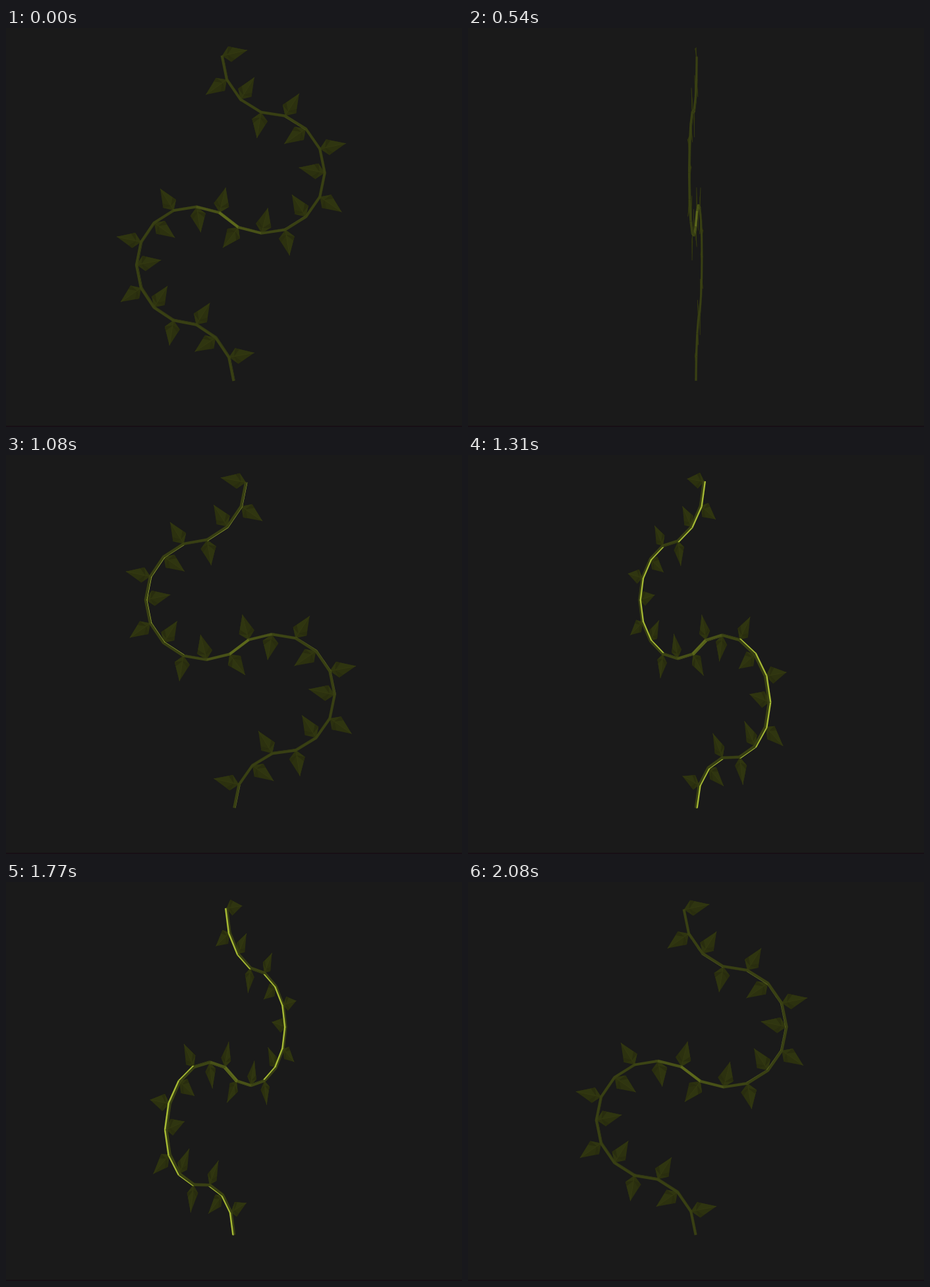
Animation of 692 by 606 pixels, one loop 2.16 s. Source, as an HTML page with a canvas:

```html
<!DOCTYPE html>
<html lang="en">
<head>
<meta charset="utf-8">
<title>Turning vine</title>
<style>
html, body { margin: 0; width: 100%; height: 100%; overflow: hidden; background: #1a1a1a; }
canvas { display: block; }
</style>
</head>
<body>
<canvas id="stage" width="692" height="606"></canvas>
<script>
const ctx = document.getElementById('stage').getContext('2d');
const W = 692, H = 606, LOOP = 2160, STEP = 77;
const AXIS = 346, EYE_Y = 222, FOCAL = 1300;
const COUNT = 25, MIDDLE = 12, TURN = 23.1;
const HALF_WIDTH = 2, HALF_DEPTH = 1.6, LEAF = 39.5;
const rad = deg => deg * Math.PI / 180;

// Grow the flat stem from the root: every link bends by the same angle,
// left for three links, right for nine, left for nine, then right again.
function grow() {
  const links = [];
  let a = [-0.5, 535.3];
  for (let i = 0; i < COUNT; i++) {
    const off = Math.abs(i - MIDDLE);
    const heading = rad(TURN * (Math.abs(9 - off) - 3.5));
    const len = 35.7 + i * 0.055;
    const dx = Math.sin(heading), dy = -Math.cos(heading);
    const b = [a[0] + dx * len, a[1] + dy * len];
    const glow = Math.max(0, 1 - off / 3) ** 2;
    const shade = `rgb(${56 + 36 * glow}, ${63 + 41 * glow}, ${19 + 8 * glow})`;
    links.push({ a, b, dx, dy, nx: -dy, ny: dx, shade, side: i % 2 ? -1 : 1 });
    a = b;
  }
  return links;
}

const links = grow();
let cos = 1, sin = 0;

function project([x, y, z = 0]) {
  const s = FOCAL / (FOCAL - x * sin - z * cos);
  return [AXIS + (x * cos - z * sin) * s, EYE_Y + (y - EYE_Y) * s];
}

function trace(points) {
  ctx.beginPath();
  for (const p of points) ctx.lineTo(...project(p));
}

function fill(points, color) {
  trace(points);
  ctx.closePath();
  ctx.fillStyle = color;
  ctx.fill();
}

function line(points, color, width) {
  trace(points);
  ctx.strokeStyle = color;
  ctx.lineWidth = width;
  ctx.stroke();
}

// True when the face with this centre and normal looks at the eye.
function facing(c, n) {
  const depth = c[0] * sin + c[2] * cos;
  const across = c[0] * cos - c[2] * sin;
  const nDepth = n[0] * sin + n[2] * cos;
  const nAcross = n[0] * cos - n[2] * sin;
  return nDepth * (FOCAL - depth) - nAcross * across - n[1] * (c[1] - EYE_Y) > 0;
}

// Leaves stand square to the stem, on alternate sides.
function drawLeaf({ b, dx, dy, nx, ny, side }) {
  const at = (u, v) => [
    b[0] + nx * side * u + dx * v,
    b[1] + ny * side * u + dy * v
  ];
  const base = at(0, 0), tip = at(LEAF, 0);
  fill([base, at(12, 12), tip, at(12, -12)], '#2c310f');
  fill([base, at(12, 12), tip], '#2f3510');
  for (const v of [-1, 1]) {
    fill([at(8, 0), at(12, 12 * v), at(18, 9.3 * v)], '#292d0f');
  }
  line([base, tip], '#363c12', 0.8);
}

function drawLink({ a, b, dx, dy, nx, ny, shade }) {
  const corner = (p, end, v, z) => [
    p[0] + dx * 0.4 * end + nx * v,
    p[1] + dy * 0.4 * end + ny * v,
    z
  ];
  const face = (v1, z1, v2, z2, color) => {
    const v = (v1 + v2) / 2, z = (z1 + z2) / 2;
    const centre = [(a[0] + b[0]) / 2 + nx * v, (a[1] + b[1]) / 2 + ny * v, z];
    if (!facing(centre, [nx * v, ny * v, z])) return;
    fill([corner(a, -1, v1, z1), corner(b, 1, v1, z1),
          corner(b, 1, v2, z2), corner(a, -1, v2, z2)], color);
  };
  const w = HALF_WIDTH, d = HALF_DEPTH;
  // Only links that climb catch the light on their left side.
  const left = dy < -0.4 ? '#a6ba33' : shade;
  face(-w, d, w, d, shade);
  face(-w, -d, w, -d, shade);
  face(w, -d, w, d, shade);
  face(-w, -d, -w, d, left);
}

// The picture advances in steps; a small lead at the start dies away.
function angleAt(t) {
  const n = Math.floor((Math.floor(t / 10) * 10 + 4.9) / STEP);
  return rad(13.4 * n + 8 * Math.exp(-1.5 * n));
}

function draw(t) {
  const angle = angleAt(t);
  cos = Math.cos(angle);
  sin = Math.sin(angle);
  ctx.fillStyle = '#1a1a1a';
  ctx.fillRect(0, 0, W, H);
  links.forEach(drawLeaf);
  links.forEach(drawLink);
  ctx.fillStyle = '#170f15';
  ctx.fillRect(0, 604, W, 2);
}

const start = performance.now();
function tick() {
  draw((performance.now() - start) % LOOP);
  requestAnimationFrame(tick);
}
tick();
</script>
</body>
</html>
```
